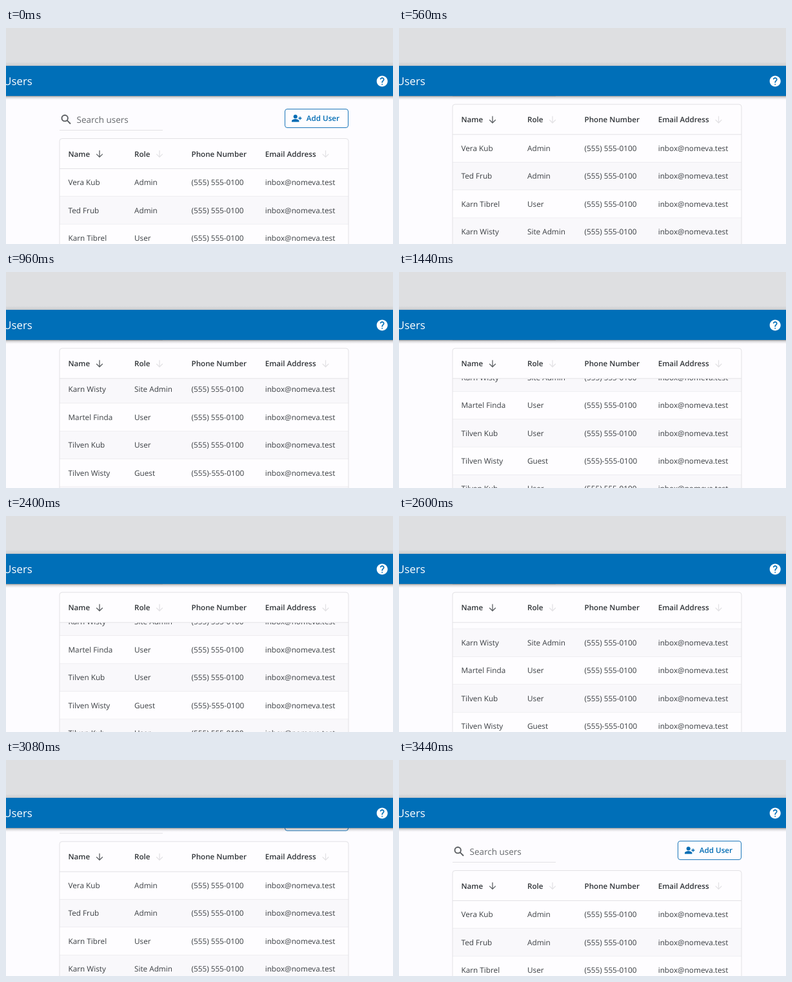
Animation of 600x337 px, one loop 3480 ms. Source, as an HTML page:

```html
<!DOCTYPE html>
<html lang="en">
<head>
<meta charset="utf-8">
<title>Users table</title>
<style>
  html, body { margin: 0; width: 100%; height: 100%; overflow: hidden; background: #fdfcff; }
  svg { display: block; width: 100%; height: 100%; }
  text { font-family: "Open Sans", sans-serif; font-size: 11.75px; fill: #3b3f43; text-rendering: geometricPrecision; }
  .head { font-size: 11.65px; font-weight: 600; fill: #303438; }
  .line { stroke: #e2e1e5; fill: none; }
  .arrow { fill: none; stroke: #5c6064; stroke-width: 1.3; }
  .dim { stroke: #e3e2e5; }
</style>
</head>
<body>
<svg viewBox="0 0 600 337" preserveAspectRatio="none">
  <defs>
    <clipPath id="body"><rect x="82" y="219.5" width="450" height="400"/></clipPath>
    <linearGradient id="below" x2="0" y2="1">
      <stop offset="0" stop-color="#000" stop-opacity=".38"/>
      <stop offset=".4" stop-color="#000" stop-opacity=".13"/>
      <stop offset="1" stop-color="#000" stop-opacity="0"/>
    </linearGradient>
    <linearGradient id="above" x2="0" y2="1">
      <stop offset="0" stop-color="#000" stop-opacity="0"/>
      <stop offset="1" stop-color="#000" stop-opacity=".09"/>
    </linearGradient>
  </defs>
  <rect width="600" height="337" fill="#fdfcff"/>

  <g id="page">
    <g fill="none" stroke="#5a5d61" stroke-width="1.9">
      <circle cx="91.2" cy="140.7" r="4.7"/>
      <path d="M94.7 144.2L100 149.5"/>
    </g>
    <text x="109.6" y="147.6" style="font-size:13.5px;fill:#66696d">Search users</text>
    <path class="line" d="M83 159.5H243"/>

    <rect x="432.5" y="126.5" width="98" height="29" rx="3.5" fill="#fefdff" stroke="#1c77ba"/>
    <g fill="#006cb4">
      <circle cx="448.7" cy="138.2" r="3"/>
      <path d="M443 146.6v-1.6c0-2 3.7-3 5.7-3s5.7 1 5.7 3v1.6z"/>
      <path d="M455.9 138.2v5M453.4 140.7h5" stroke="#006cb4" stroke-width="1.4"/>
    </g>
    <text class="head" x="465.8" y="145.4" style="fill:#006cb4">Add User</text>

    <g clip-path="url(#body)"><g id="rows"></g></g>
    <g id="header">
      <path d="M83 219.5V176.5a4 4 0 0 1 4-4H527a4 4 0 0 1 4 4V219.5z" fill="#fefdff"/>
      <path class="line" d="M83 219.5H531M83 420V176.5a4 4 0 0 1 4-4H527a4 4 0 0 1 4 4V420"/>
    </g>
  </g>

  <rect width="600" height="59" fill="#dedfe1"/>
  <rect y="53" width="600" height="6" fill="url(#above)"/>
  <rect y="106" width="600" height="6" fill="url(#below)"/>
  <rect y="59" width="600" height="47" fill="#006fb8"/>
  <text x="40.8" y="89" text-anchor="end" style="font-size:16.8px;font-weight:500;fill:#fff">Users</text>
  <path transform="translate(573 72.7) scale(.85)" fill="#fff" d="M12 2C6.48 2 2 6.48 2 12s4.48 10 10 10 10-4.48 10-10S17.52 2 12 2zm1 17h-2v-2h2v2zm2.07-7.75l-.9.92C13.45 12.9 13 13.5 13 15h-2v-.5c0-1.1.45-2.1 1.17-2.83l1.24-1.26c.37-.36.59-.86.59-1.41 0-1.1-.9-2-2-2s-2 .9-2 2H8c0-2.21 1.79-4 4-4s4 1.79 4 4c0 .88-.36 1.68-.93 2.25z"/>
</svg>
<script>
const LOOP = 3480, PAGE = 53.4, TABLE = 153.2, PITCH = 43.4, TOP = 219.5;
const COLS = [96.5, 199, 287.5, 401.7];
const users = [
  ["Vera Kub", "Admin"], ["Ted Frub", "Admin"], ["Karn Tibrel", "User"],
  ["Karn Wisty", "Site Admin"], ["Martel Finda", "User"], ["Tilven Kub", "User"],
  ["Tilven Wisty", "Guest", "(555)-555-0100"], ["Tilven Kub", "User"], ["Vera Wisty", "User"]
];

const byId = id => document.getElementById(id);
const page = byId("page"), rows = byId("rows"), header = byId("header");

function add(parent, tag, attrs, text = "") {
  const el = document.createElementNS("http://www.w3.org/2000/svg", tag);
  for (const key in attrs) el.setAttribute(key, attrs[key]);
  el.textContent = text;
  parent.appendChild(el);
}

users.forEach(([name, role, phone = "(555) 555-0100"], i) => {
  const y = TOP + i * PITCH;
  add(rows, "rect", { x: 83, y, width: 448, height: PITCH, fill: i % 2 ? "#f9f8fb" : "#fefdff" });
  add(rows, "path", { class: "line", d: `M83 ${y + PITCH}H531` });
  [name, role, phone, "inbox@nomeva.test"].forEach((text, c) =>
    add(rows, "text", { x: COLS[c], y: y + 25.8 }, text));
});

["Name", "Role", "Phone Number", "Email Address"].forEach((text, c) =>
  add(header, "text", { class: "head", x: COLS[c], y: 200.7 }, text));
[145, 238, 495.5].forEach((x, i) => add(header, "path", {
  class: i ? "arrow dim" : "arrow",
  d: `M${x} 191v10.2m-4.8-4.6l4.8 4.8 4.8-4.8`
}));

const part = (t, from, to) => Math.min(1, Math.max(0, (t - from) / (to - from)));
const sine = u => (1 - Math.cos(Math.PI * u)) / 2;
const cubic = u => u < .5 ? 4 * u ** 3 : 1 - 4 * (1 - u) ** 3;
const smooth = u => u * u * (3 - 2 * u);

// Total scroll distance: page first, then the rows under the fixed header.
function scrollAt(t) {
  if (t < 2384) return PAGE * sine(part(t, 55, 430)) + TABLE * cubic(part(t, 552, 1146));
  return (PAGE + TABLE) * (1 - smooth(part(t, 2384, 3440) ** .867));
}

function draw(t) {
  const scroll = scrollAt(t), shift = Math.min(scroll, PAGE);
  page.setAttribute("transform", `translate(0 ${-shift})`);
  rows.setAttribute("transform", `translate(0 ${shift - scroll})`);
}

const start = performance.now();
function tick() {
  draw((performance.now() - start) % LOOP);
  requestAnimationFrame(tick);
}
draw(0);
requestAnimationFrame(tick);
</script>
</body>
</html>
```
